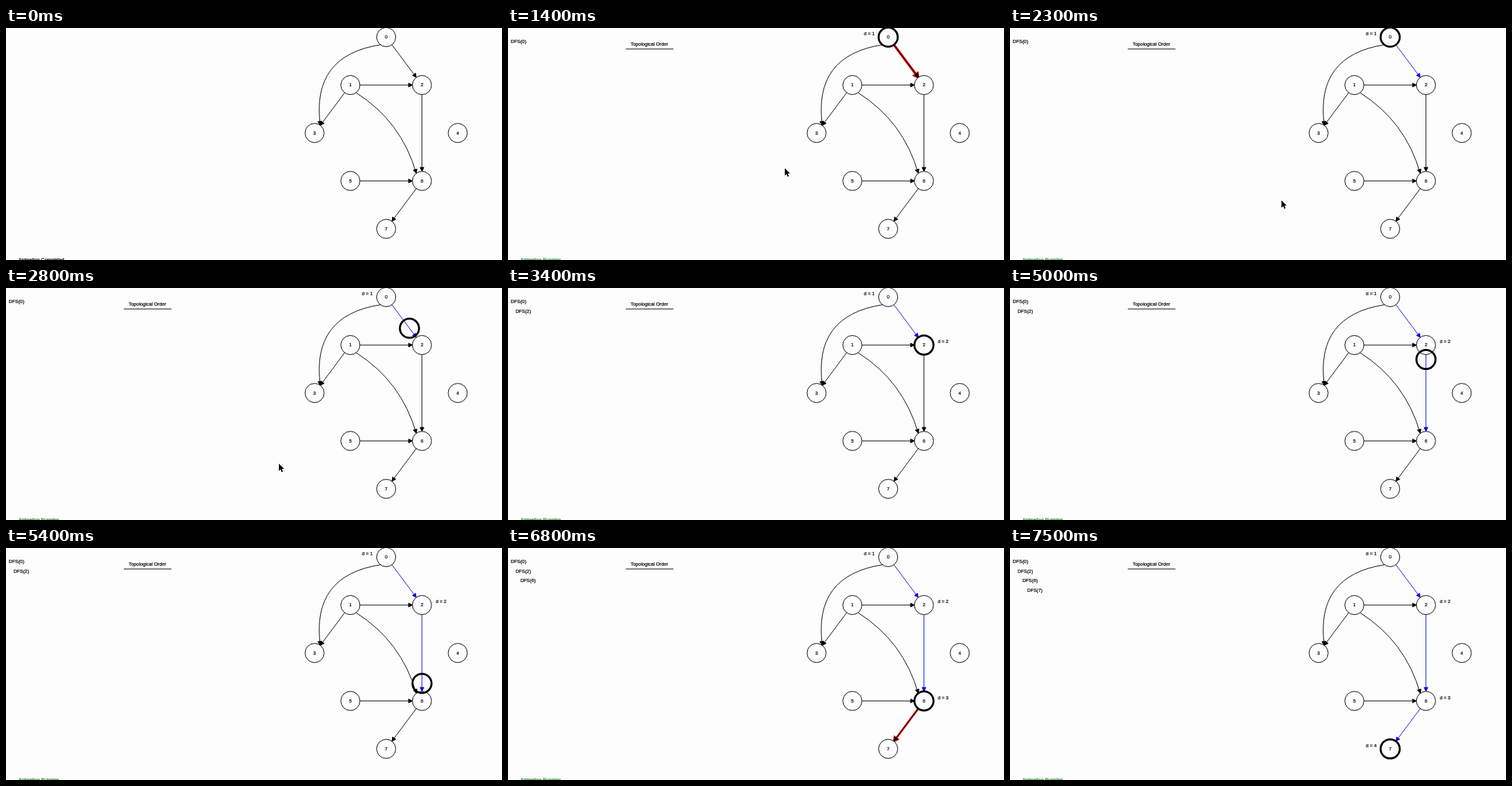
An HTML page that plays this animation: 758x354 px, repeating every 8 s.

```html
<!DOCTYPE html>
<html lang="en">
<head>
<meta charset="utf-8">
<title>Depth-first search</title>
<style>
  html, body { margin: 0; width: 100%; height: 100%; overflow: hidden; background: #fdfdfd; }
  svg { display: block; }
  text {
    font: 7.3px "Liberation Sans", Arial, sans-serif;
    fill: currentColor; stroke: currentColor; stroke-width: 0.22;
  }
</style>
</head>
<body>
<svg id="stage" width="758" height="354" viewBox="0 0 758 354"></svg>
<script>
const LOOP = 8000, STEP = 100, R = 14.6;
const PULSE_TIME = 900, MOVE_TIME = 600, SETTLE = 90;
const BLACK = "#000", RED = "#c80000", BLUE = "#0a0ae6", PAPER = "#fdfdfd";
const stage = document.getElementById("stage");

// diamond of pairs: one node, three pairs, one node
const nodes = Array.from({ length: 8 }, (_, i) => {
  const row = Math.ceil(i / 2);
  const col = (i % 2 ? -1 : 1) * (2 - Math.abs(row - 2));
  return { col, x: 581 + 54.7 * col, y: 13.9 + 73.15 * row };
});

// visited nodes: when each is entered, and when the edge leaving it lights up
const visits = [
  { node: 0, enter: 900, leave: 1200 },
  { node: 2, enter: 3100, leave: 4000 },
  { node: 6, enter: 5600, leave: 6000 },
  { node: 7, enter: 7500 }
];

// from, to, bend
const edges = [
  [0, 2], [0, 3, 0.49], [1, 2], [1, 3], [1, 6, -0.19], [2, 6], [5, 6], [6, 7]
].map(([from, to, bend = 0]) => {
  const i = visits.findIndex(v => v.node === to);
  const last = visits[i - 1];
  const red = last && last.node === from ? last.leave : Infinity;
  return { from: nodes[from], to: nodes[to], bend, red, blue: red + PULSE_TIME };
});

// pointer: time, x, y
const trail = [
  [500, 330, -20], [900, 404, 236], [1100, 404, 236], [1400, 423, 214],
  [2100, 414, 261], [2800, 417, 268], [3400, 444, 360]
];

function set(el, attrs) {
  for (const key in attrs) el.setAttribute(key, attrs[key]);
}

function add(tag, attrs, parent = stage) {
  const el = document.createElementNS("http://www.w3.org/2000/svg", tag);
  set(el, attrs);
  return parent.appendChild(el);
}

function show(el, on) {
  el.setAttribute("visibility", on ? "visible" : "hidden");
}

function label(str, x, midY, anchor = "start") {
  const el = add("text", { x, y: midY + 2.3, "text-anchor": anchor });
  el.textContent = str;
  return el;
}

const mix = (a, b, k) => a + (b - a) * k;
const clamp = k => Math.max(0, Math.min(1, k));

function edgeShape({ from, to, bend }) {
  const len = Math.hypot(to.x - from.x, to.y - from.y);
  const ux = (to.x - from.x) / len * R, uy = (to.y - from.y) / len * R;
  const x1 = from.x + ux, y1 = from.y + uy, x2 = to.x - ux, y2 = to.y - uy;
  const cx = (x1 + x2) / 2 - (y2 - y1) * bend;
  const cy = (y1 + y2) / 2 + (x2 - x1) * bend;
  const reach = Math.hypot(x2 - cx, y2 - cy);
  const vx = (x2 - cx) / reach, vy = (y2 - cy) / reach;
  const baseX = x2 - vx * 5.9, baseY = y2 - vy * 5.9, w = 2.95;
  return {
    line: `M${x1} ${y1}Q${cx} ${cy} ${x2} ${y2}`,
    head: `M${x2} ${y2}L${baseX - vy * w} ${baseY + vx * w}L${baseX + vy * w} ${baseY - vx * w}Z`
  };
}

for (const e of edges) {
  const { line, head } = edgeShape(e);
  e.glow = add("g", { stroke: RED, fill: RED });
  e.ink = add("g", { "stroke-width": 1 });
  for (const layer of [e.glow, e.ink]) {
    add("path", { d: line, fill: "none" }, layer);
    add("path", { d: head }, layer);
  }
}

nodes.forEach(({ x, y }, i) => {
  add("circle", { cx: x, cy: y, r: R, fill: PAPER, stroke: BLACK, "stroke-width": 1 });
  label(i, x, y, "middle");
});

const ring = add("circle", { r: R, fill: "none", stroke: BLACK, "stroke-width": 3 });

const title = [
  label("Topological Order", 216.2, 24.4, "middle"),
  add("path", { d: "M180 32H252.8", stroke: BLACK })
];
const status = label("", 19, 353.2);

visits.forEach((v, i) => {
  const { x, y, col } = nodes[v.node];
  v.parts = [
    label(`DFS(${v.node})`, 4.3 + 7.3 * i, 20.8 + 14.63 * i),
    label(`d = ${i + 1}`, col ? x + 21 : x - 37.2, y - 5.1)
  ];
});

const pointer = add("path", {
  d: "M0 0V11.2L2.6 8.8L4.3 12.9L6.2 12.1L4.5 8.1H8Z",
  fill: BLACK, stroke: "#fff", "stroke-width": 0.7, "paint-order": "stroke"
});

// the ring glides to each node and arrives just before it is entered
function ringAt(t) {
  let { x, y } = nodes[visits[0].node];
  for (const { node, enter } of visits.slice(1)) {
    const k = clamp((t - enter + SETTLE) / MOVE_TIME + 1);
    x = mix(x, nodes[node].x, k);
    y = mix(y, nodes[node].y, k);
  }
  return { cx: x, cy: y };
}

function pointerAt(t) {
  const i = trail.findIndex(p => p[0] > t);
  if (i < 1) return null;
  const [t0, x0, y0] = trail[i - 1], [t1, x1, y1] = trail[i];
  const k = (t - t0) / (t1 - t0);
  return [mix(x0, x1, k), mix(y0, y1, k)];
}

function draw(t) {
  const running = t >= 600;
  status.textContent = running ? "Animation Running" : "Animation Completed";
  status.style.color = running ? "#118811" : BLACK;
  title.forEach(el => show(el, running));

  const pulse = 2.3 + 1.4 * Math.abs((t / 840 + 0.4) % 2 - 1);
  for (const e of edges) {
    const ink = t >= e.blue ? BLUE : BLACK;
    show(e.glow, t >= e.red && t < e.blue);
    set(e.glow, { "stroke-width": pulse });
    set(e.ink, { stroke: ink, fill: ink });
  }

  show(ring, t >= 700);
  set(ring, ringAt(t));

  for (const v of visits) v.parts.forEach(el => show(el, t >= v.enter));

  const tip = pointerAt(t);
  show(pointer, tip);
  if (tip) set(pointer, { transform: `translate(${tip})` });
}

const begin = performance.now();
function tick() {
  const t = (performance.now() - begin) % LOOP;
  draw(Math.floor(t / STEP) * STEP);
  requestAnimationFrame(tick);
}
tick();
</script>
</body>
</html>
```
